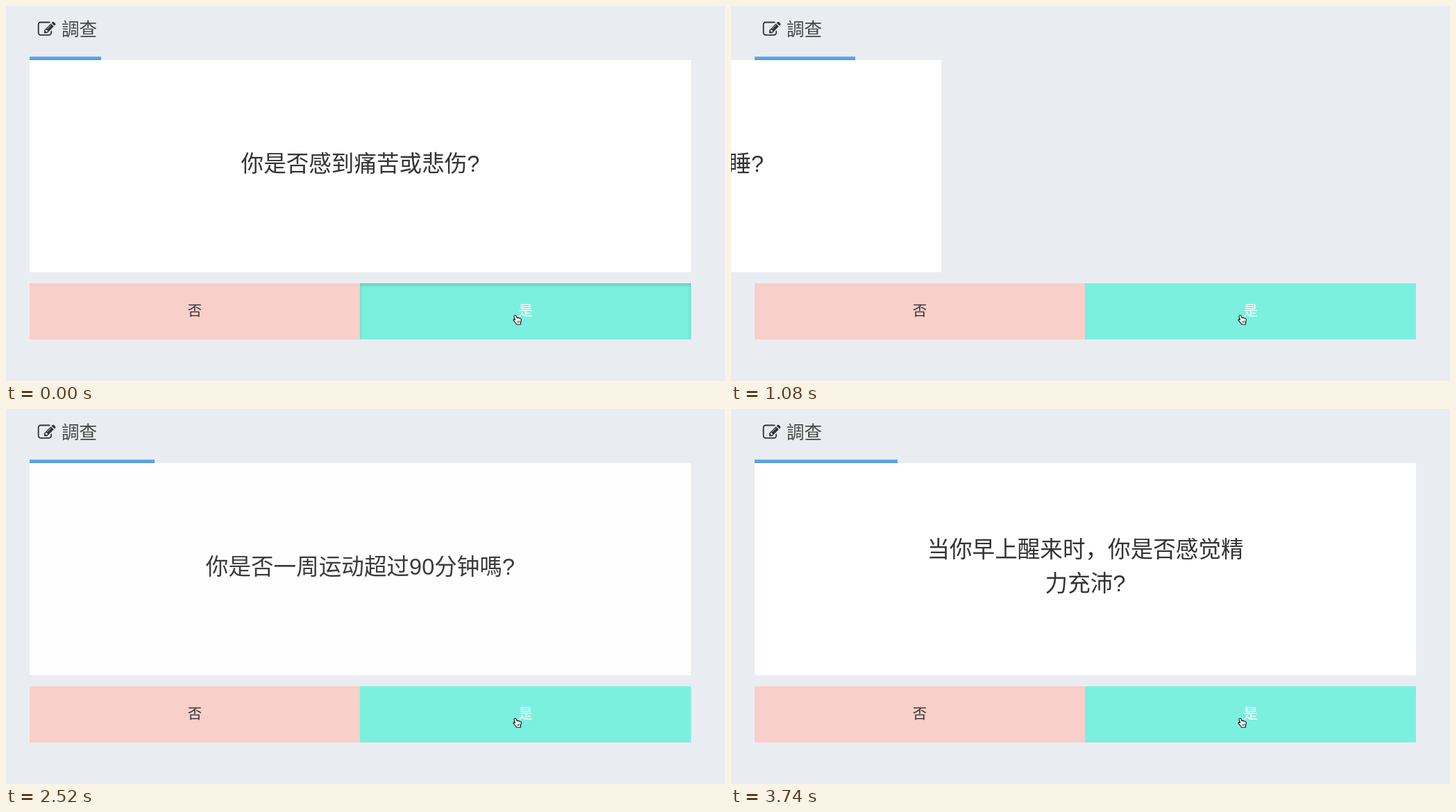
An HTML page that plays this animation: 1036 by 541 pixels, repeating every 3760 ms.

```html
<!DOCTYPE html>
<html lang="zh-CN">
<head>
<meta charset="utf-8">
<style>
html, body { margin: 0; width: 1036px; height: 541px; overflow: hidden; background: #e9edf2; }
div, svg { position: absolute; left: 0; top: 0; }
#bar { left: 34px; top: 73px; height: 5px; background: #5aa5ec; box-shadow: inset 0 -1px #4b8fd2; }
#card { left: 34px; top: 78px; width: 953px; height: 306px; }
.btn { top: 400px; height: 81px; }
#no { left: 34px; width: 476px; background: #f8cfc9; }
#yes { left: 510px; width: 477px; background: #7cf0de; }
#yes.down { box-shadow: inset 0 3px 5px rgba(0, 0, 0, .16); }
text { font-family: "Liberation Sans", "Noto Sans CJK SC", "Noto Sans CJK", sans-serif; fill: #333; text-anchor: middle; }
#ask { font-size: 32.6px; }
.label { font-size: 20.4px; }
</style>
</head>
<body>
<div id="bar"></div>
<div id="card"></div>
<div class="btn" id="no"></div>
<div class="btn" id="yes"></div>
<svg width="1036" height="541">
  <path fill="#333" transform="translate(45.8 20.7) scale(.0144)" d="M888 1184l116-116-152-152-116 116v56h96v96h56zm440-720q-16-16-33 1l-350 350q-17 17-1 33t33-1l350-350q17-17 1-33zm80 594v190q0 119-84.5 203.5t-203.5 84.5h-832q-119 0-203.5-84.5t-84.5-203.5v-832q0-119 84.5-203.5t203.5-84.5h832q63 0 117 25 15 7 18 23 3 17-9 29l-49 49q-14 14-32 8-23-6-45-6h-832q-66 0-113 47t-47 113v832q0 66 47 113t113 47h832q66 0 113-47t47-113v-126q0-13 9-22l64-64q15-15 35-7t20 29zm-96-738l288 288-672 672h-288v-288zm444 132l-92 92-288-288 92-92q28-28 68-28t68 28l152 152q28 28 28 68t-28 68z"/>
  <text x="105.6" y="43.3" font-size="25.6" style="fill:#444">調查</text>
  <g id="ask"><text x="510.5"></text><text x="510.5" y="263"></text></g>
  <text class="label" x="272" y="446.8">否</text>
  <text class="label" x="748.8" y="446.8" style="fill:#fff">是</text>
  <path fill="#fff" stroke="#111" stroke-width="1.1" stroke-linejoin="round" d="M732.6 446.6c1.3-.8 2.3.2 2.7 1.3l1 2.2c.8-.8 1.9-.5 2.2.2.8-.5 1.7-.1 2 .6 1-.3 1.8.3 1.9 1.4.1 2.2-.2 3.4-1 5.1v1.8h-5.8c-.6-1.4-1.8-2.5-2.8-3.7-.8-1-2.3-2.1-1.8-3 .5-.8 1.5-.4 2.6.5l-1.3-4c-.3-1-.4-1.9.3-2.4z"/>
  <path fill="none" stroke="#111" stroke-width=".7" d="M736.9 454.3v2.8M738.6 454.1v3M740.3 454v2.8"/>
</svg>
<script>
const LOOP = 3760, SLIDE = 500, FADE = 130, WIDTH = 953, PRESS = 90;
const clicks = [20, 868, 1896.8, 2908.5];
const questions = [
  ['你是否感到痛苦或悲伤?'],
  ['没有服药，你是否会难以入睡?'],
  ['你目前是否在抽无烟卷烟，或每', '周抽5支以上香烟或雪茄?'],
  ['你是否一周运动超过90分钟嗎?'],
  ['当你早上醒来时，你是否感觉精', '力充沛?']
];
const $ = id => document.getElementById(id);
const bar = $('bar'), card = $('card'), yes = $('yes'), ask = $('ask');
const clamp = x => Math.min(1, Math.max(0, x));

// cubic-bezier(.25, .1, .25, 1)
function ease(x) {
  x = clamp(x);
  let lo = 0, hi = 1, s;
  for (let i = 0; i < 30; i++) {
    s = (lo + hi) / 2;
    if (.75 * s * (1 - s) + s ** 3 < x) lo = s; else hi = s;
  }
  return .3 * (1 - s) ** 2 * s + 3 * (1 - s) * s * s + s ** 3;
}

function draw(t) {
  const n = clicks.filter(c => c <= t).length;
  const since = n ? t - clicks[n - 1] : LOOP;
  const leaving = since < SLIDE;
  const shift = leaving ? -WIDTH * ease(since / SLIDE) : 0;
  const shown = leaving ? 1 : clamp((since - SLIDE) / FADE);
  const [first, second = ''] = questions[leaving ? n - 1 : n];

  ask.children[0].textContent = first;
  ask.children[0].setAttribute('y', second ? 214 : 238.5);
  ask.children[1].textContent = second;
  ask.setAttribute('transform', `translate(${shift} 0)`);
  ask.setAttribute('opacity', shown);

  // the card fades in with a slight mint tint that goes first
  const mint = 27 * shown * (1 - shown) ** 2;
  card.style.background = `rgb(${233 + 22 * shown}, ${237 + 18 * shown + mint}, ${242 + 13 * shown})`;
  card.style.transform = `translateX(${shift}px)`;

  bar.style.width = WIDTH / 37 * (n ? 3 + n + ease(since / 600) : 4) + 'px';
  yes.classList.toggle('down', clicks[n] - t <= PRESS);
}

let start;
function tick() {
  const now = performance.now();
  start ??= now;
  draw((now - start) % LOOP);
  requestAnimationFrame(tick);
}
tick();
</script>
</body>
</html>
```
